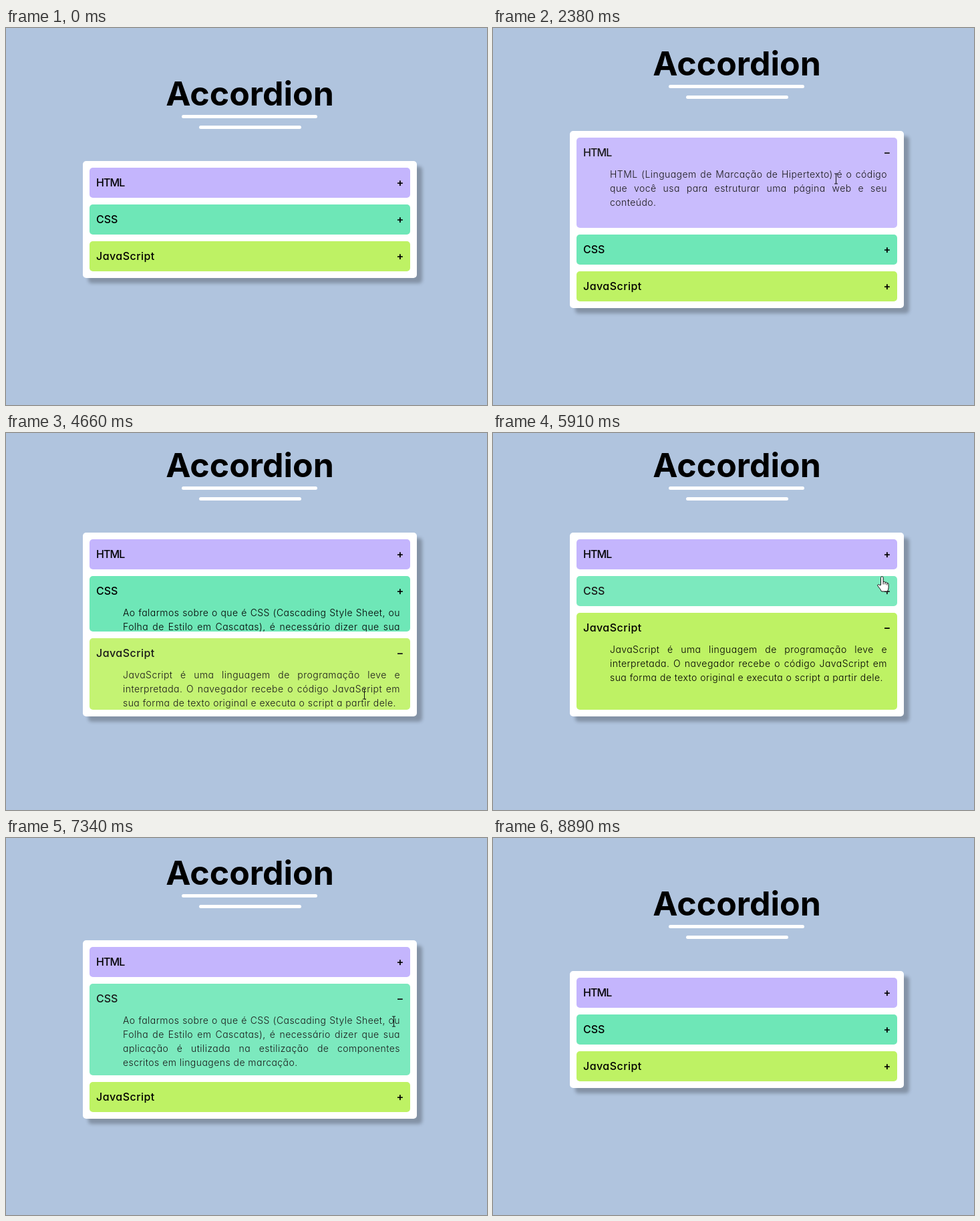
These frames come from a looping animation (720 px wide and 564 px high, 8960 ms). An HTML page:

```html
<!DOCTYPE html>
<html lang="pt">
<head>
<meta charset="utf-8">
<title>Accordion</title>
<style>
  html, body { margin: 0; width: 100%; height: 100%; overflow: hidden; background: #b0c4de; }
  body { position: relative; font-family: Inter, "Open Sans", sans-serif; color: #000; font-feature-settings: "cv11"; }
  .card {
    position: absolute; left: 115px; top: 199px; width: 480px; padding: 10px;
    background: #fff; border-radius: 5px; box-shadow: 8px 8px 5px rgba(0, 0, 0, .25);
  }
  h1 {
    position: absolute; left: 0; top: -137px; width: 100%; margin: 0;
    font-size: 50px; line-height: 72px; font-weight: 700; text-align: center;
  }
  .bar { position: absolute; height: 5px; border-radius: 2.5px; background: #fff; }
  .panel { position: relative; height: 45px; overflow: hidden; border-radius: 5px; }
  .panel + .panel { margin-top: 10px; }
  .name, .sign { position: absolute; top: 0; line-height: 45px; font-size: 16px; font-weight: 500; }
  .name { left: 10px; }
  .sign { right: 7px; width: 16px; text-align: center; font-weight: 600; }
  .text { position: absolute; left: 50px; right: 15px; top: 44px; font-size: 14px; font-weight: 300; letter-spacing: .45px; }
  .text div { height: 21px; line-height: 21px; white-space: nowrap; text-align-last: justify; }
  .text div:last-child { text-align-last: left; }
  svg { position: absolute; left: 0; top: 0; overflow: visible; }
</style>
</head>
<body>
<div class="card">
  <h1>Accordion</h1>
  <div class="bar" style="left:148px; top:-69px; width:203px"></div>
  <div class="bar" style="left:174px; top:-53px; width:153px"></div>
  <div class="panel" style="background:#c4b5fd">
    <div class="name" style="letter-spacing:-.9px">HTML</div><div class="sign">+</div>
    <div class="text">
      <div>HTML (Linguagem de Marcação de Hipertexto) é o código</div>
      <div>que você usa para estruturar uma página web e seu</div>
      <div>conteúdo.</div>
    </div>
  </div>
  <div class="panel" style="background:#6ee7b7">
    <div class="name">CSS</div><div class="sign">+</div>
    <div class="text">
      <div>Ao falarmos sobre o que é CSS (Cascading Style Sheet, ou</div>
      <div>Folha de Estilo em Cascatas), é necessário dizer que sua</div>
      <div>aplicação é utilizada na estilização de componentes</div>
      <div>escritos em linguagens de marcação.</div>
    </div>
  </div>
  <div class="panel" style="background:#bef264">
    <div class="name" style="letter-spacing:.45px">JavaScript</div><div class="sign">+</div>
    <div class="text">
      <div>JavaScript é uma linguagem de programação leve e</div>
      <div>interpretada. O navegador recebe o código JavaScript em</div>
      <div>sua forma de texto original e executa o script a partir dele.</div>
    </div>
  </div>
</div>
<svg width="1" height="1" fill="#fff" stroke="#111" stroke-linejoin="round">
  <g id="cursor">
    <path id="arrow" d="M0 0V16L3.7 12.6 6.2 18.4 8.7 17.3 6.2 11.7H11.3Z"/>
    <path id="hand" d="M-2 13V2a1.8 1.8 0 0 1 3.6 0v6q2.4-.8 2.9.9 2.3-.8 2.8 1 2.3-.4 2.3 1.8v5q0 3-1.8 5.8H-1q-1.5-3.5-4.5-6.8-1.5-2-1.5-2.7 1.8-1.8 3.5.2zM1.6 8v4M4.5 9v3M7.3 10v3"/>
    <path id="beam" fill="none" d="M-2.5-7.5h5M-2.5 7.5h5M0-7.5v15"/>
  </g>
</svg>
<script>
const LOOP = 8960, FADE = 500, GLIDE = 400, HEAD = 45, BODY = 100, GAP = 10, MIDDLE = 286.5;

// click time and panel: a click toggles its panel and closes any other
const clicks = [[2070, 0], [3360, 1], [4480, 2], [6180, 2], [7015, 1], [7850, 1]];

// where the pointer comes to rest: arrival time, x, y
const stops = [
  [120, 716, 575], [420, 645, 215], [900, 390, 80], [1350, 475, 150], [1840, 513, 226],
  [3000, 533, 328], [4300, 536, 391], [5120, 575, 262], [5400, 582, 180], [6150, 582, 278],
  [6510, 582, 244], [6820, 580, 275], [7750, 582, 240], [8570, 692, 575]
];

const $ = s => document.querySelector(s);
const card = $('.card'), cursor = $('#cursor');
const shapes = ['arrow', 'hand', 'beam'].map(id => $('#' + id));
const panels = [...document.querySelectorAll('.panel')];
const signs = panels.map(p => p.querySelector('.sign'));
const clamp = x => Math.min(1, Math.max(0, x));
const smooth = x => x * x * (3 - 2 * x);

// cubic-bezier(.25, .1, .25, 1)
function ease(x) {
  if (x <= 0 || x >= 1) return clamp(x);
  const at = (u, a, b) => 3 * u * (1 - u) ** 2 * a + 3 * u * u * (1 - u) * b + u ** 3;
  let lo = 0, hi = 1;
  for (let i = 0; i < 24; i++) {
    const mid = (lo + hi) / 2;
    if (at(mid, .25, .25) < x) lo = mid; else hi = mid;
  }
  return at(lo, .1, 1);
}

// the open panel and how far each one is unfolded
function accordion(t) {
  const parts = panels.map(() => 0);
  let open = -1;
  for (const [time, i] of clicks) {
    if (time > t) break;
    const k = ease((t - time) / FADE);
    if (open >= 0) parts[open] -= k;
    open = open === i ? -1 : i;
    if (open >= 0) parts[open] += k;
  }
  return { open, parts };
}

function pointer(t) {
  let [last, x, y] = stops[0];
  for (const [time, nx, ny] of stops.slice(1)) {
    const run = Math.min(GLIDE, time - last);
    const k = smooth(clamp((t - time + run) / run));
    x += (nx - x) * k;
    y += (ny - y) * k;
    last = time;
  }
  return [x, y];
}

function draw(t) {
  const { open, parts } = accordion(t);
  const heights = parts.map(p => HEAD + BODY * p);
  const total = 4 * GAP + heights.reduce((a, b) => a + b);
  const top = MIDDLE - total / 2;
  const [x, y] = pointer(t);
  const overTitle = x > 239 && x < 491 && y > top - 137 && y < top - 72;
  let kind = overTitle ? 2 : 0, edge = top + GAP;

  card.style.top = top + 'px';
  panels.forEach((panel, i) => {
    const over = x > 125 && x < 605 && y >= edge && y < edge + heights[i];
    if (over) kind = y < edge + HEAD ? 1 : 2;
    panel.style.height = heights[i] + 'px';
    panel.style.opacity = over ? .9 : 1;
    signs[i].textContent = i === open ? '−' : '+';
    edge += heights[i] + GAP;
  });

  cursor.setAttribute('transform', `translate(${Math.round(x) + .5} ${Math.round(y) - .5})`);
  shapes.forEach((s, i) => s.style.display = i === kind ? '' : 'none');
}

const start = performance.now();
function tick() {
  draw((performance.now() - start) % LOOP);
  requestAnimationFrame(tick);
}
tick();
</script>
</body>
</html>
```
